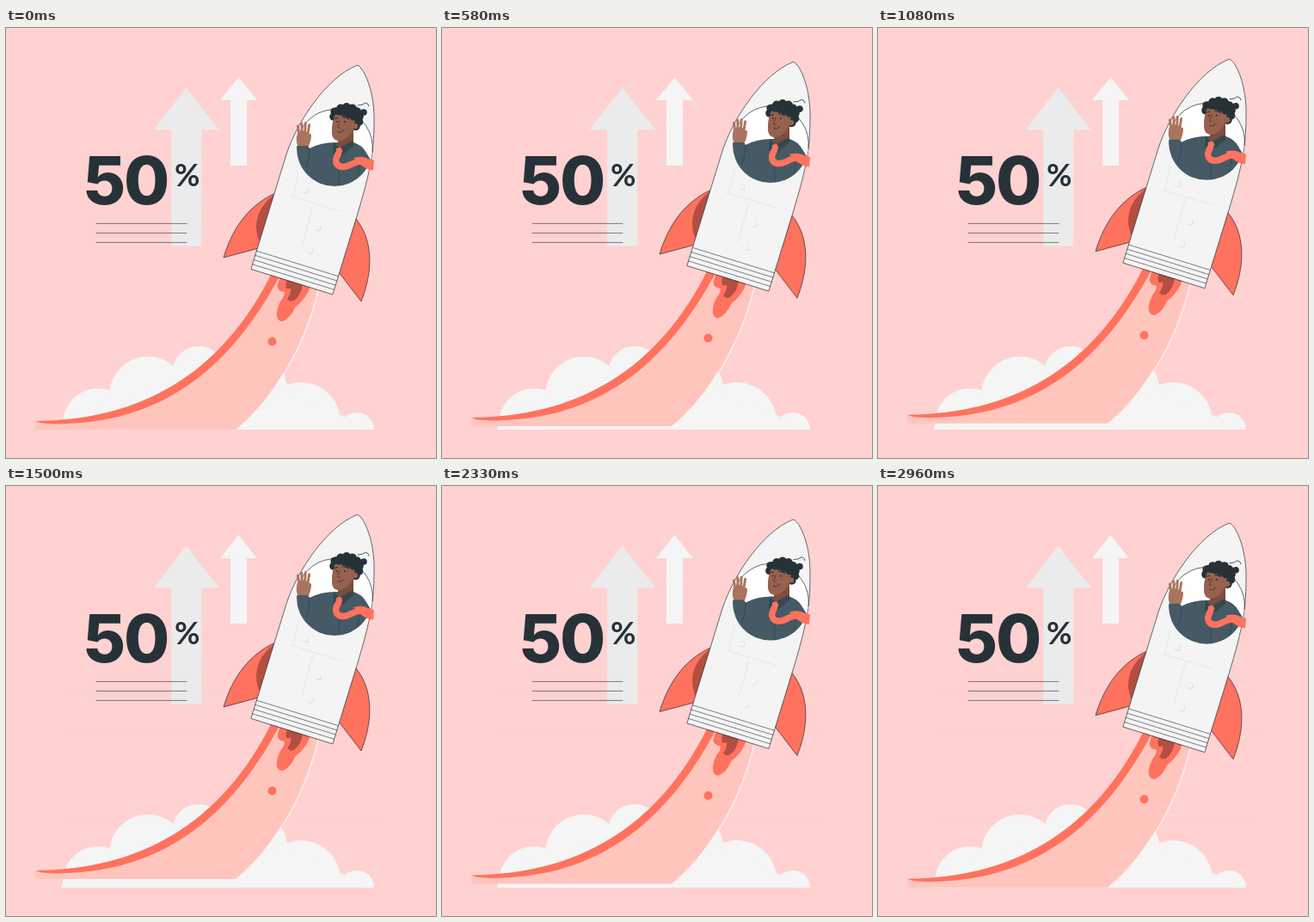
An HTML page with a canvas that plays this animation: 500x500 px, repeating every 3 s.

```html
<!DOCTYPE html>
<html lang="en">
<head>
<meta charset="utf-8">
<title>Rocket</title>
<style>
html, body { margin: 0; width: 100%; height: 100%; overflow: hidden; background: #ffd1d1; }
canvas { display: block; width: 100vw; height: 100vh; }
</style>
</head>
<body>
<canvas id="stage"></canvas>
<script>
const LOOP = 3000, FPS = 24, RISE = 10;
const SKY = '#ffd1d1', RED = '#ff725e', DEEP = '#b24f42', INK = '#263238';
const SHIRT = '#455a64', PALE = '#f5f5f5', SKIN = '#96614d', PALM = '#aa745f';
const canvas = document.getElementById('stage');
const ctx = canvas.getContext('2d');

function fill(d, color) {
  ctx.fillStyle = color;
  ctx.fill(new Path2D(d));
}

function line(d, color, width = 0.8) {
  ctx.strokeStyle = color;
  ctx.lineWidth = width;
  ctx.stroke(new Path2D(d));
}

function shape(d, color) {
  fill(d, color);
  line(d, INK, 0.7);
}

function disc(x, y, r, color) {
  ctx.fillStyle = color;
  ctx.beginPath();
  ctx.arc(x, y, r, 0, 2 * Math.PI);
  ctx.fill();
}

function clipped(trace, paint) {
  ctx.save();
  ctx.beginPath();
  trace();
  ctx.clip();
  paint();
  ctx.restore();
}

// Places the visible left edge of a glyph at x
function glyph(s, x, y, font) {
  ctx.font = font;
  ctx.fillText(s, x + ctx.measureText(s).actualBoundingBoxLeft, y);
}

function arrow(x, top, half, head, stem, bottom, color) {
  fill(`M${x} ${top}l${half} ${head}H${x + stem}V${bottom}H${x - stem}V${top + head}H${x - half}Z`, color);
}

function chart() {
  for (let i = 0; i < 8; i++) line(`M68 ${108.5 + 45.8 * i}H440`, '#f3dcda', 1);
  arrow(209.7, 69.5, 38.5, 49, 17.6, 253.5, '#ebebeb');
  arrow(270.5, 57, 21.5, 27, 9.6, 160, PALE);
  ctx.fillStyle = INK;
  glyph('5', 92.5, 205, '800 77px Inter, sans-serif');
  glyph('0', 140, 205, '800 77px Inter, sans-serif');
  glyph('%', 197, 183.5, '700 36px Lato, sans-serif');
  for (let i = 0; i < 3; i++) line(`M105 ${227.4 + 11 * i}H210`, INK, 0.6);
}

function clouds() {
  clipped(() => ctx.rect(0, 0, 500, 467), () => {
    const puffs = [[107, 460, 41], [165, 427, 45], [224, 401, 31],
      [285, 420, 42], [343, 458, 46], [408, 467, 20]];
    for (const [x, y, r] of puffs) disc(x, y, r, PALE);
    fill('M72 446L64 467H428L343 430L165 420Z', PALE);
  });
}

function trail() {
  fill('M34 457C155 456 250 404 309 288L362 304C345 375 306 436 267 467H34Z', '#ffc5bd');
  line('M322 404Q350 360 363 306', '#fff0ed', 1.2);
  fill('M35 457C155 456 250 404 309 285L319 287C252 413 165 460 58 460.5Q38 460 35 457Z', RED);
  fill('M319 288L315.5 300Q316 306 324 307Q324 312 319 318Q314 328 315 336Q317 342 322 341Q331 337 336 325Q350 314 354 300Z', RED);
  fill('M328 291Q324 297 326 303L331.5 303Q331 310 327 315Q331 320 336 316Q344 309 345 297Z', DEEP);
  disc(309.5, 364.5, 5, RED);
}

function hull() {
  shape('M311 193C284 206 264 230 253 267L294 256Z', RED);
  fill('M313 193Q292 208 291 230Q291 243 296 250Z', DEEP);
  shape('M407 222C426 245 428 280 413 318L387 284Z', RED);
  shape('M285 280L326 147C338 110 372 58 408 43.5C414 43 428 69 428 105C428 140 426 160 407 222L380 309.5Z', '#f4f4f4');
  for (let k = 1; k < 5; k++) line(`M${285 + 1.6 * k} ${280 - 5.2 * k}l95 29.5`, INK, 0.6);
  line('M330 195l59 18M340 168l-7 28M357 207l-13 46', '#e4e4e4');
  for (const [x, y] of [[348.5, 188.5], [363, 232.5], [354, 259]]) {
    disc(x, y, 3.6, '#e0e0e0');
    disc(x - 0.4, y - 0.4, 3, PALE);
  }
  disc(382, 140, 44, '#fff');
  line('M342 121A44 44 0 0 1 426 144', INK, 0.7);
}

function hand() {
  fill('M339 122Q346 117 352 122L355 124Q355 132 351 139L340 139Q336 131 339 122Z', PALM);
  for (let i = 0; i < 4; i++)
    line(`M${341 + 3.2 * i} 125L${339.4 + 4.4 * i} ${110.5 + 1.3 * (i - 1.7) ** 2}`, PALM, 2.9);
}

function head() {
  // Curls ring the head from the left temple over the top to the nape
  for (let i = 0; i < 9; i++) {
    const a = Math.PI * (1.05 + i * 0.15);
    disc(396 + 15 * Math.cos(a), 105 + 13 * Math.sin(a), 5, INK);
  }
  disc(400, 103, 11, INK);
  disc(416, 98, 3.8, INK);
  line('M409 90Q415 90 418 87Q422 88 422 91', INK);
  fill('M386 118L404 115L404 135Q396 142 386 136Z', '#7d4e3d');
  fill('M384 98C380 106 379 113 379 119C378 129 384 132 389 131C397 129 403 122 405 113L406 102Q397 93 384 98Z', SKIN);
  disc(406, 114, 3.2, SKIN);
  for (let i = 0; i < 5; i++) disc(381.5 + 5.6 * i, 97 + 0.4 * i * i, 4.2, INK);
  disc(384.5, 109, 1, INK);
  disc(394, 109, 1, INK);
  line('M381.5 105.5L385.5 104.5M392 104Q396 103.5 398.5 106', INK, 1.1);
  line('M388 108L385.5 115.5L388 116', '#593026');
  line('M385.5 121Q390 122 393 118.5', INK);
}

function pilot() {
  hand();
  clipped(() => ctx.arc(382, 140, 44, 0, 2 * Math.PI), () => {
    fill('M336 140L338 137L351 137L353 140Q366 133 383 133L404 133Q414 136 419 145L427 158V186H337Z', SHIRT);
    line('M353 140Q353 152 349 163M387 148V185M409 150Q412 159 409 174', '#32444d');
  });
  head();
  fill('M381 133L387 140L403 131L405 136L390 149L386 143L380 147Z', '#37474f');
  line('M386.5 146C380 157 386 162 393 161.5C402 161 404 153 418 156', RED, 7.5);
  fill('M404 151Q414 148 421 152L428 154L427 165.5Q420 165 414 160.5Z', RED);
  fill('M384 140L389 138.5L391.5 143L388 148L384 146Z', RED);
}

function draw(ms) {
  const scale = devicePixelRatio || 1;
  const w = Math.round(innerWidth * scale), h = Math.round(innerHeight * scale);
  if (canvas.width !== w || canvas.height !== h) {
    canvas.width = w;
    canvas.height = h;
  }
  ctx.setTransform(w / 500, 0, 0, h / 500, 0, 0);
  ctx.lineCap = ctx.lineJoin = 'round';
  ctx.fillStyle = SKY;
  ctx.fillRect(0, 0, 500, 500);

  const step = Math.floor((ms % LOOP + 4) * FPS / 1000);
  const phase = step * 1000 / FPS / LOOP;
  chart();
  clouds();
  ctx.translate(0, -RISE * (1 - Math.abs(2 * phase - 1)));
  trail();
  hull();
  pilot();
}

const start = performance.now();
function tick() {
  draw(performance.now() - start);
  requestAnimationFrame(tick);
}
tick();
</script>
</body>
</html>
```
